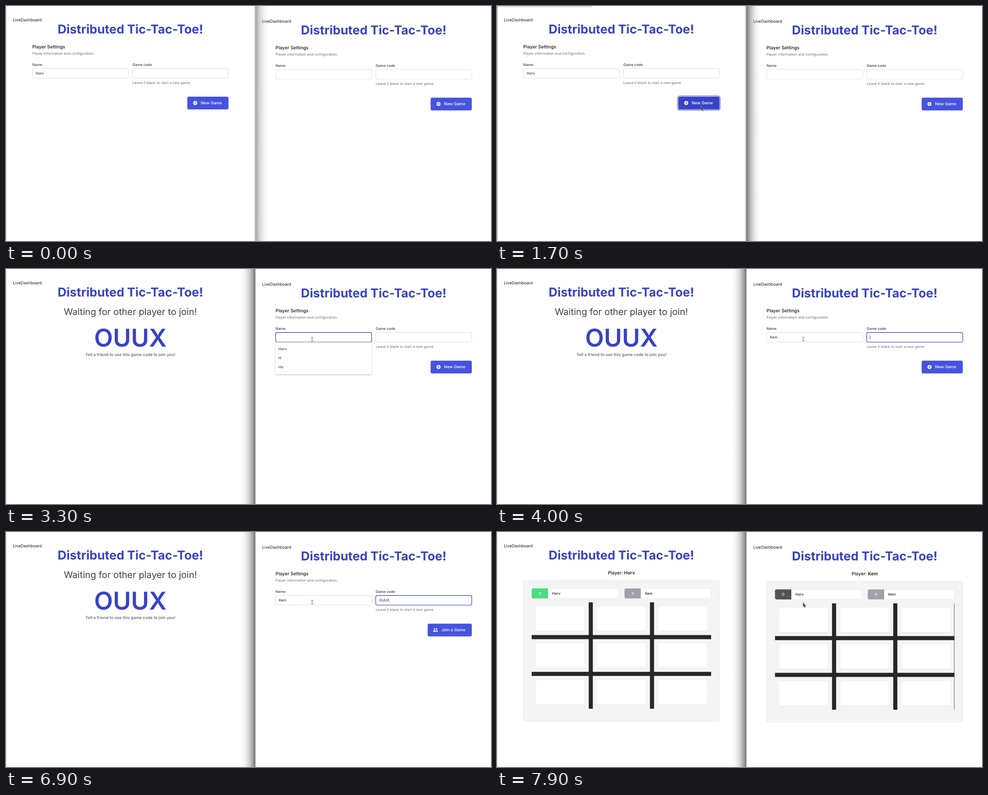
Animation, 1076 px wide and 521 px high, one loop 8 s. Source, as an HTML page:

```html
<!DOCTYPE html>
<html lang="en">
<head>
<meta charset="utf-8">
<title>Distributed Tic-Tac-Toe</title>
<style>
html, body { margin: 0; width: 100%; height: 100%; overflow: hidden; background: #fff; }
svg { display: block; width: 1076px; height: 521px; font-family: Inter, sans-serif; text-rendering: geometricPrecision; }
</style>
</head>
<body>
<svg id="stage" viewBox="0 0 1076 521"></svg>
<script>
const LOOP = 8000, STEP = 100;
const SCALE = 435 / 768;
const HOST = 'Horv', GUEST = 'Kem', CODE = 'OUUX';
const INDIGO = '#4553df', DEEP = '#3843c4', INK = '#18181b', GRAY = '#71717a', LINE = '#d4d4d8', BAR = '#27272a';
const stage = document.getElementById('stage');
const pen = document.createElement('canvas').getContext('2d');

const clamp = v => Math.max(0, Math.min(1, v));
const mix = (a, b, k) => a + (b - a) * k;
const progress = (t, from, to) => clamp((t - from) / (to - from));
const ease = k => k * k * (3 - 2 * k);
const typed = (t, word, times) => word.slice(0, times.filter(at => t >= at).length);

const rect = (x, y, w, h, fill, extra = '') =>
  `<rect x="${x}" y="${y}" width="${w}" height="${h}" fill="${fill}" ${extra}/>`;
const text = (x, y, size, str, fill = INK, weight = 400, anchor = 'start') =>
  `<text x="${x}" y="${y}" font-size="${size * SCALE}" fill="${fill}" font-weight="${weight}" text-anchor="${anchor}">${str}</text>`;
const group = (x, y, body) => `<g transform="translate(${x} ${y})">${body}</g>`;

const fade = (id, x1, x2) => `<linearGradient id="${id}" x1="${x1}" x2="${x2}">` +
  [1, .62, .34, .15, .05, 0].map((o, i) => `<stop offset="${i / 5}" stop-opacity="${o}"/>`).join('') + '</linearGradient>';
const DEFS = `<defs>${fade('toRight', 0, 1)}${fade('toLeft', 1, 0)}
  <linearGradient id="down" x2="0" y2="1"><stop stop-opacity=".2"/><stop offset="1" stop-opacity="0"/></linearGradient>
  <filter id="soft" x="-10%" y="-10%" width="120%" height="130%"><feDropShadow dx="0" dy=".6" stdDeviation=".6" flood-opacity=".13"/></filter>
  <filter id="popup" x="-5%" y="-5%" width="110%" height="115%"><feDropShadow dx="0" dy=".6" stdDeviation=".8" flood-opacity=".45"/></filter></defs>`;

function input(x, value, focused, caret) {
  pen.font = `${14 * SCALE}px Inter, sans-serif`;
  const caretX = x + 7.1 + pen.measureText(value).width;
  return rect(x, 138.5, 213, 21.4, '#fff', `rx="3.4" stroke="${focused ? INDIGO : LINE}" stroke-width="${focused ? 1.4 : .8}"`) +
    text(x + 7.3, 151.9, 14, value) + (caret ? rect(caretX, 144.8, .8, 9, INK) : '');
}

const plusIcon = fill => `<circle cx="10" cy="10" r="8" fill="#fff"/><path d="M10 6.5v7M6.5 10h7" stroke="${fill}" stroke-width="2" stroke-linecap="round"/>`;
const usersIcon = '<path fill="#fff" d="M9 6a3 3 0 1 1-6 0a3 3 0 0 1 6 0zM17 6a3 3 0 1 1-6 0a3 3 0 0 1 6 0zM12.9 17q.5-3-1.4-5.3A5 5 0 0 1 19 16v1zM6 11a5 5 0 0 1 5 5v1H1v-1a5 5 0 0 1 5-5z"/>';

function button({ join, hover, ring, y = 201 }) {
  const x = join ? 395.7 : 402.3, fill = hover ? DEEP : INDIGO, w = 493.6 - x;
  const icon = `<g transform="translate(${x + 11.8} ${y + 8.3}) scale(${SCALE})">${join ? usersIcon : plusIcon(fill)}</g>`;
  return (ring ? rect(x - 1.6, y - 1.6, w + 3.2, 31.5, 'none', `rx="4.8" stroke="${INDIGO}" stroke-width="1.2"`) : '') +
    rect(x, y, w, 28.3, fill, 'rx="3.4"') + icon +
    text(join ? 426 : 432, y + 16.9, 16, join ? 'Join a Game' : 'New Game', '#fff', 500);
}

function settings({ name = '', code = '', focus, caret, error, ...action }) {
  return text(58.3, 94.1, 18, 'Player Settings', INK, 500) +
    text(58.3, 108.1, 14, 'Player information and configuration.', GRAY) +
    text(58.3, 133, 14, 'Name', '#3f3f46', 500) + text(280.5, 133, 14, 'Game code', '#3f3f46', 500) +
    input(58.5, name, focus === 'name', focus === 'name' && caret) +
    input(280.5, code, focus === 'code', focus === 'code' && caret) +
    text(280.5, 172.9, 14, 'Leave it blank to start a new game', GRAY) +
    (error ? text(280.5, 185.2, 14, 'should be 4 character(s)', '#dc2626') : '') +
    button({ ...action, y: error ? 214.6 : 201 });
}

const suggestions = () => rect(58, 160.3, 213.6, 71, '#fff', 'rx="1.5" filter="url(#popup)"') +
  [HOST, HOST[0], HOST.slice(0, 2)].map((s, i) => text(65, 177.4 + i * 20.4, 14, s)).join('');

const waiting = () => text(276, 102.4, 36, 'Waiting for other player to join!', '#3f3f46', 400, 'middle') +
  text(276, 171.8, 96, CODE, DEEP, 600, 'middle') +
  text(276, 193.1, 16, 'Tell a friend to use this game code to join you!', GRAY, 600, 'middle');

function badge(x, symbol, name, fill) {
  return rect(x, 125.3, 191.6, 21.6, '#fff', 'rx="3.4" stroke="#e4e4e7" stroke-width=".6"') +
    `<path d="M${x + 36.2} 125v22.2h-32.8a3.4 3.4 0 0 1-3.4-3.4v-15.4a3.4 3.4 0 0 1 3.4-3.4z" fill="${fill}"/>` +
    text(x + 18.1, 138.9, 14, symbol, '#fff', 500, 'middle') + text(x + 45.3, 138.9, 14, name, INK, 500);
}

function board(player, turnColor) {
  let s = `<text x="276" y="94.2" font-size="${18 * SCALE}" font-weight="500" text-anchor="middle" fill="${INK}">Player: <tspan font-weight="600">${player}</tspan></text>` +
    rect(58.5, 107, 435, 312.2, '#f4f4f5', 'rx="4.5" stroke="#e4e4e7" stroke-width=".8"') +
    badge(77, 'O', HOST, turnColor) + badge(282.9, 'X', GUEST, '#a1a1aa');
  for (let i = 0; i < 2; i++)
    s += rect(203.5 + i * 135.8, 156, 9.1, 235.8, BAR) + rect(77, 228.5 + i * 81.5, 398, 9.1, BAR);
  for (let i = 0; i < 9; i++)
    s += rect(86.2 + i % 3 * 135.7, 165.2 + Math.floor(i / 3) * 81.5, 108.2, 54.4, '#fff', 'rx="4.5" filter="url(#soft)"');
  return s;
}

const title = () => text(276, 61.3, 48, 'Distributed Tic-Tac-Toe!', DEEP, 700, 'middle');

function loadingBar(t, start, x, width) {
  if (t < start || t >= start + 300) return '';
  return rect(x, 0, mix(210, width, progress(t, start, start + 100)), 4, 'url(#down)',
    `rx="1" opacity="${1 - progress(t, start + 100, start + 300)}"`);
}

function windowShadows(t) {
  const right = progress(t, 2600, 3000);
  const left = mix(.36, .56, progress(t, 1500, 1700)) * (1 - right);
  return rect(0, 0, 2, 521, '#000', `opacity="${mix(left * .3, .07, right)}"`) +
    rect(550, 0, 3, 521, '#000', `opacity="${left * .28}"`) +
    rect(553, 0, 32, 521, 'url(#toRight)', `opacity="${left}"`) +
    rect(520, 0, 33, 521, 'url(#toLeft)', `opacity="${right * .54}"`) +
    rect(553, 0, 2, 521, '#000', `opacity="${right * .14}"`);
}

const arrow = (x, y) => group(x, y, '<path d="M.4.2V10.6L2.7 8.6 4.3 12 6 11.2 4.5 8H7.4Z" fill="#3f3f42" stroke="#ccc" stroke-width=".5"/>');
const beam = (x, y) => group(x, y, '<path d="M-2.4-4.4H-.7L0-3.8 .7-4.4H2.4M0-3.8V3.8M-2.4 4.6H-.7L0 3.8 .7 4.6H2.4" fill="none" stroke="#555" stroke-width=".9"/>');

function pointer(t) {
  if (t < 400) return '';
  if (t < 1200) {
    const k = ease(progress(t, 400, 900));
    return arrow(mix(345, 447, k), mix(45, 220.5, k));
  }
  if (t < 2500) {
    const k = ease(progress(t, 1900, 2400));
    return arrow(mix(452, 672, k), mix(221, 168, k));
  }
  if (t < 2700) return arrow(684, 161);
  return t < 7600 ? beam(679.2, 155.7) : arrow(678.5, 156);
}

function leftPane(t) {
  if (t < 1800) return settings({ name: HOST, hover: t >= 800, ring: t >= 1600 });
  return t < 7700 ? waiting() : board(HOST, '#4ade80');
}

function rightPane(t) {
  if (t >= 7600) return board(GUEST, '#52525b') + rect(474.5, 156, .7, 235.8, BAR);
  const code = typed(t, CODE, [4700, 5000, 5100, 6300]);
  const caretOff = [[3300, 3500], [4500, 4700], [5700, 6300], [6900, 7500]].some(([a, b]) => t >= a && t < b);
  const form = settings({
    name: typed(t, GUEST, [3500, 3600, 3800]), code,
    focus: t < 2700 ? '' : t < 4000 ? 'name' : 'code',
    caret: !caretOff, join: code !== '', error: t >= 4700 && t < 6400
  });
  return form + (t >= 2800 && t < 3500 ? suggestions() : '');
}

function render(t) {
  stage.innerHTML = DEFS + windowShadows(t) +
    text(15.2, 34.4, 16, 'LiveDashboard') + text(568.4, 36.7, 16, 'LiveDashboard') +
    title() + leftPane(t) + group(539.8, 2.2, title() + rightPane(t)) +
    loadingBar(t, 1700, 0, 550) + loadingBar(t, 7500, 555, 521) + pointer(t);
}

let shown = -1;
function tick() {
  const t = Math.floor(performance.now() % LOOP / STEP) * STEP;
  if (t !== shown) render(shown = t);
  requestAnimationFrame(tick);
}
tick();
</script>
</body>
</html>
```
